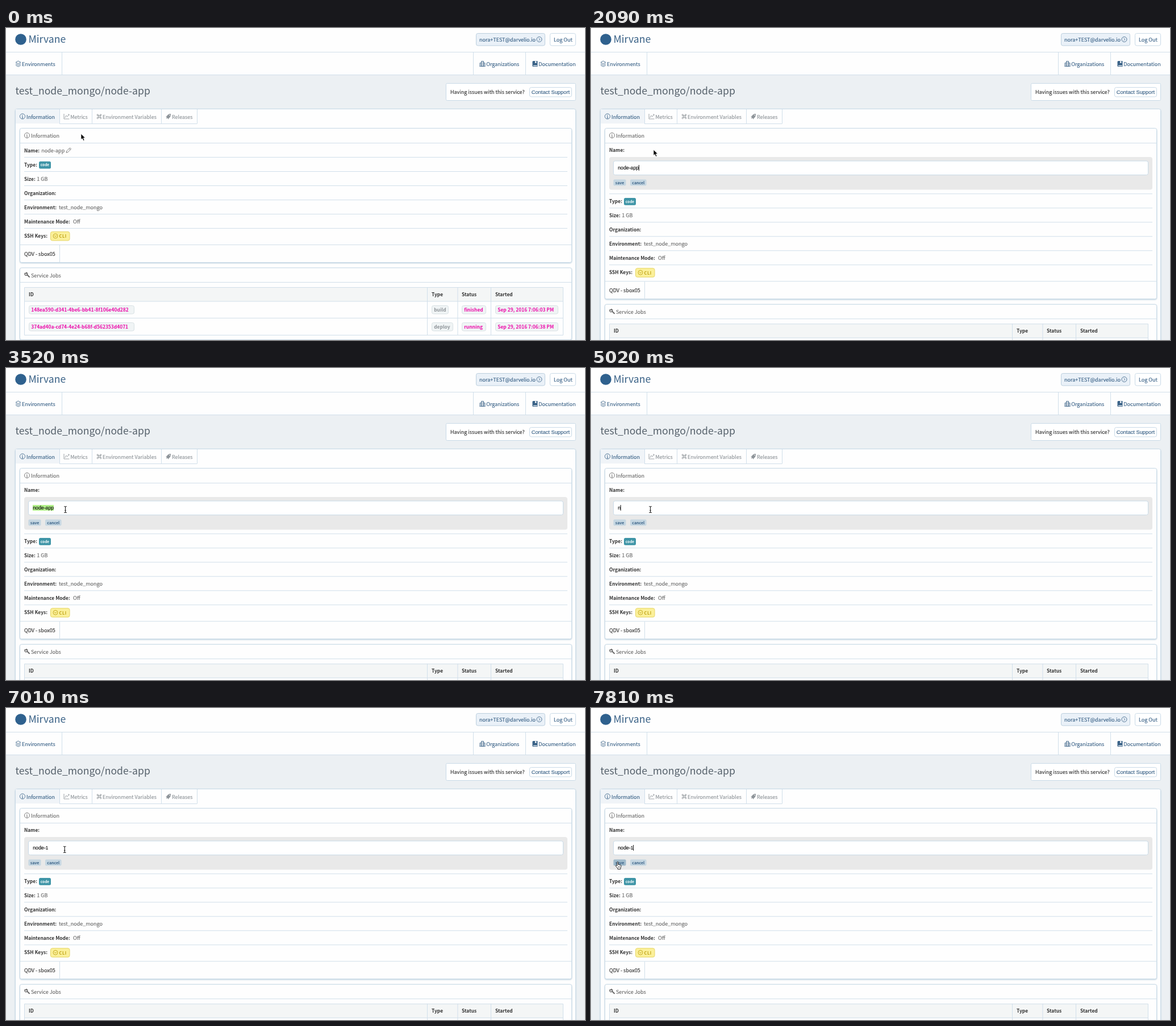
Animation of 1019x549 px, one loop 7990 ms. Source, as an HTML page:

```html
<!DOCTYPE html>
<html lang="en">
<head>
<meta charset="utf-8">
<title>Rename a service</title>
<style>
html, body { margin: 0; width: 100%; height: 100%; overflow: hidden; background: #ecf0f3; }
svg { display: block; width: 100%; height: 100%; }
text { font: 9px "Noto Sans CJK JP", "Noto Sans CJK SC", "Noto Sans CJK", "Noto Sans", sans-serif;
  fill: currentColor; stroke: currentColor; stroke-width: .15px; white-space: pre; }
.big { font-size: 17.6px; stroke-width: 0; }
.b { font-weight: 700; font-size: 8.43px; stroke-width: 0; }
.ui { font-family: "Liberation Sans", Arial, sans-serif; font-size: 9.34px; }
.field { font-size: 8.75px; }
.tiny { font-size: 7px; }
.dark { color: #333; } .grey { color: #6a6a6a; } .mute { color: #8e9499; }
.blue { color: #3a6287; } .pink { color: #ec0ca9; }
.box { fill: #fff; stroke: #c9dae7; }
.card { fill: #fefefe; stroke: #c9dae7; filter: drop-shadow(0 1px 1px #b9cedd); }
.line { fill: none; stroke: #d1dfea; }
.pill { fill: #f0f4f5; stroke: #d9e2e5; }
.icon { fill: none; stroke: currentColor; stroke-width: .85; stroke-linejoin: round; }
.solid { fill: currentColor; stroke: none; }
</style>
</head>
<body>
<svg viewBox="0 0 1019 549">
  <defs>
    <g id="info" class="icon"><circle r="4.6"/><path d="M0-.8V2.8M-1 2.8H1M-1-.8H0M0-2.8V-1.8"/></g>
  </defs>

  <rect width="1019" height="42" fill="#fefefe"/>
  <rect y="42" width="1019" height="40" fill="#fefefe"/>
  <path class="line" d="M0 42.5H1019M0 82.5H1019M98.5 43V82M822.5 43V82M914.5 43V82"/>

  <circle cx="26" cy="20" r="9.8" fill="#2f618e"/>
  <text class="big blue" x="39.5" y="26">Mirvane</text>
  <rect x="827.5" y="9.5" width="121" height="21.5" rx="3" fill="#eaf1f8" stroke="#bccfde"/>
  <text class="blue" x="833" y="23.5">nora+TEST@darvelio.io</text>
  <g class="icon blue"><circle cx="938.5" cy="20" r="4.5"/><path d="M937.5 17.8L939.8 20L937.5 22.2"/></g>
  <rect class="box" x="957.5" y="9.5" width="45" height="21.5" rx="3"/>
  <text class="blue" x="964" y="23.5">Log Out</text>

  <g class="blue">
    <path class="icon" d="M17 60.5L21.5 58L26 60.5L21.5 63ZM17 63L21.5 65.5L26 63M17 65.5L21.5 68L26 65.5"/>
    <text x="28" y="66.5">Environments</text>
    <path class="icon" d="M836.5 67.5V58.500H840.500V67.500M834 67.500V61.500H836.500M840.500 61.500H843V67.500M833.500 67.500H843.500"/>
    <path class="icon" stroke-dasharray="1 1" d="M837.800 60V67M839.300 60V67M835.200 63V67M841.800 63V67"/>
    <text x="845.3" y="66.5">Organizations</text>
    <path class="solid" fill-rule="evenodd" d="M928 58H935.500V68H928Q926.500 68 926.500 66.500V59.500Q926.500 58 928 58ZM928 65.800V67H934.700V65.800ZM931 58.500V62L932.200 61L933.500 62V58.500Z"/>
    <text x="937.3" y="66.5">Documentation</text>
  </g>

  <text class="big" color="#56616b" x="16.5" y="117">test_node_mongo/node-app</text>
  <rect class="box" x="774.5" y="97.5" width="228" height="30" rx="2"/>
  <text class="dark" x="782" y="116">Having issues with this service?</text>
  <rect class="box" x="921.5" y="104.5" width="74" height="16.5" rx="3"/>
  <text class="ui blue" x="924.7" y="116">Contact Support</text>

  <rect class="card" x="16.5" y="142.5" width="986" height="430" rx="3"/>
  <path fill="#f0f4f8" d="M17 143H94V168H17Z"/>
  <path class="line" d="M94.5 143V168M151.5 143V168M273.5 143V168M336.5 143V168M94 168.5H336.5"/>
  <use href="#info" x="29" y="155.5" class="blue"/>
  <text class="blue" x="36" y="159.5">Information</text>
  <g class="mute">
    <path class="icon" d="M102 151V160H111.5M103.500 158L106 154L108 156L111 152M109.300 152H111V153.700"/>
    <text x="113.3" y="159.5">Metrics</text>
    <g class="icon">
      <path d="M162.500 153V158.500M165.500 153V158.500M161.300 154.200H166.700M161.300 157.200H166.700"/>
      <circle cx="161.300" cy="153" r="1.200"/><circle cx="166.700" cy="153" r="1.200"/>
      <circle cx="161.300" cy="158.500" r="1.200"/><circle cx="166.700" cy="158.500" r="1.200"/>
    </g>
    <text x="170" y="159.5">Environment Variables</text>
    <path class="solid" fill-rule="evenodd" d="M290 151C286 151 284.500 153 283 155L281 156L283 156.800L282 159.500L285 158.500L285.500 161L287 158.500C289 157 290.200 155 290 151ZM288 152.500A.8.8 0 1 1 287.900 152.500Z"/>
    <text x="292" y="159.5">Releases</text>
  </g>

  <rect id="infoCard" class="card" x="24.5" y="176.5" width="971" rx="3"/>
  <path class="line" d="M25 202.5H995"/>
  <use href="#info" x="37" y="189" class="grey"/>
  <text class="grey" x="44" y="193">Information</text>
  <text id="nameLabel" class="b dark" x="32" y="219">Name:</text>

  <g id="nameView" class="grey">
    <text x="62.3" y="219">node-app</text>
    <path class="icon" d="M106 219.3L106.8 216.5L112.5 210.8L114.6 212.9L108.9 218.5ZM111 212.3L113.1 214.4"/>
  </g>

  <g id="editor">
    <rect x="32" y="227" width="956" height="57.5" rx="4" fill="#e9e9e9"/>
    <rect class="box" x="39.5" y="234" width="941" height="24.5" rx="3"/>
    <rect id="selection" x="47" y="241" width="37" height="10" fill="#b0ef89"/>
    <text id="field" class="ui field" color="#111" x="47.2" y="249.3"></text>
    <rect id="caret" y="241" width="1" height="10" fill="#111"/>
    <rect id="save" x="39.5" y="266.5" width="22" height="11" rx="2"/>
    <rect x="69" y="266.5" width="28.5" height="11" rx="2" fill="#c6d7e2"/>
    <text class="b tiny blue" x="42.7" y="274.5">save</text>
    <text class="b tiny blue" x="72.3" y="274.5">cancel</text>
  </g>

  <g id="lower">
    <path class="line" d="M32 227.5H988M32 252.5H988M32 277.5H988M32 302.5H988M32 327.5H988M32 352.5H988M25 381.5H995M94.5 382V412"/>
    <g class="dark">
      <text class="b" x="32" y="244">Type:</text>
      <text class="b" x="32" y="269">Size:</text>
      <text class="b" x="32" y="294">Organization:</text>
      <text class="b" x="32" y="319">Environment:</text>
      <text class="b" x="32" y="344">Maintenance Mode:</text>
      <text class="b" x="32" y="369">SSH Keys:</text>
    </g>
    <g class="grey">
      <text x="54.3" y="269">1 GB</text>
      <text x="93" y="319">test_node_mongo</text>
      <text x="118" y="344">Off</text>
    </g>
    <rect x="58" y="234.8" width="21" height="12.7" rx="2.5" fill="#3f95a7"/>
    <text class="b" style="font-size:6.5px" color="#fff" x="68.5" y="243.3" text-anchor="middle">code</text>
    <g color="#bd9f10">
      <rect x="78.5" y="358.5" width="33.5" height="15.5" rx="3" fill="#fbf09a" stroke="#e6d566"/>
      <g class="icon"><circle cx="87" cy="366" r="4"/><path d="M85 365L87 367.2L89 365"/></g>
      <text class="b" style="font-size:7.3px;letter-spacing:.6px" x="93.5" y="369.3">CLI</text>
    </g>
    <text class="dark" x="32" y="401">QDV - sbox05</text>

    <rect class="card" x="24.5" y="422" width="971" height="126.5" rx="3"/>
    <path class="line" d="M25 447.5H995"/>
    <g class="icon grey">
      <path stroke-width="1.4" d="M33.3 431.3A2.500 2.500 0 1 0 35.600 430.300L35.800 432.300Z"/>
      <path stroke-width="2" stroke-linecap="round" d="M37.300 434.300L41 438"/>
    </g>
    <text class="grey" x="44" y="439">Service Jobs</text>
    <rect x="32.5" y="456" width="948" height="25" fill="#f4f6f6"/>
    <path class="line" stroke="#d5dcdf" d="M32.5 456.5H980.5V540.5H32.5ZM32 481H981M32 510.5H981M741.5 456V541M795 456V541M853.5 456V541"/>
    <g class="dark">
      <text class="b" x="40" y="472">ID</text>
      <text class="b" x="749" y="472">Type</text>
      <text class="b" x="802" y="472">Status</text>
      <text class="b" x="861" y="472">Started</text>
    </g>
    <g id="jobs"></g>
  </g>

  <g id="arrow"><path d="M0 0V10L2.3 8L4.2 12L6 11.2L4.2 7.3H7.5Z" fill="#000" stroke="#fff" stroke-width=".7"/></g>
  <g id="ibeam"><path d="M-2.3-5.5Q0-5.5 0-4Q0-5.5 2.3-5.5M0-4.5V4.5M-2.3 5.5Q0 5.5 0 4Q0 5.5 2.3 5.5M-1.2 1.5H1.2" fill="none" stroke="#222" stroke-width="1.1"/></g>
  <g id="hand"><path d="M3 1C3-.3 5-.3 5 1V5L9 5.8Q10.3 6.2 10 8L9 11V13H4V11.5L.7 8C-.3 6.6 1.2 5.8 2 6.5L3 7.5Z" fill="#fff" stroke="#111" stroke-width=".9"/><path d="M5.4 8V10.5M7.2 8V10.5" stroke="#111" stroke-width=".7"/></g>
</svg>
<script>
const $ = id => document.getElementById(id);
const LOOP = 7990, EDIT_SHIFT = 64.3, LETTER = 4.87;

const pill = (x, y, width, label, tone) =>
  `<rect class="pill" x="${x}" y="${y}" width="${width}" height="14.5" rx="3"/>
   <text class="b ${tone}" x="${x + 3.7}" y="${y + 10.8}">${label}</text>`;
const job = (y, id, type, typeWidth, status, statusWidth, started) =>
  pill(40.5, y, 185, id, "pink") + pill(749.5, y, typeWidth, type, "mute") +
  pill(802.5, y, statusWidth, status, "pink") + pill(861.5, y, 110, started, "pink");
$("jobs").innerHTML =
  job(488.5, "148ea590-d341-4be6-bb41-8f106e40d282", "build", 29, "finished", 42, "Sep 29, 2016 7:06:03 PM") +
  job(518.5, "374ad40a-cd74-4e24-b68f-d562353d4071", "deploy", 37, "running", 42, "Sep 29, 2016 7:06:38 PM");

// Each step changes only the listed parts of the state.
const steps = [
  [0, { cursor: ["arrow", 132, 186.3], text: "node-app", caret: false }],
  [180, { cursor: ["arrow", 121.5, 203] }],
  [480, { cursor: ["arrow", 110, 214.3] }],
  [2090, { editing: true, caret: true }],
  [2390, { cursor: ["ibeam", 114.5, 249], caret: false }],
  [2630, { cursor: ["ibeam", 104.5, 249] }],
  [2930, { caret: true }],
  [3380, { caret: false }],
  [3520, { selected: true }],
  [5020, { selected: false, text: "n", caret: true }],
  [5320, { text: "no" }],
  [5490, { text: "node" }],
  [6090, { caret: false }],
  [6410, { text: "node-", caret: true }],
  [6560, { text: "node-1" }],
  [7010, { caret: false, cursor: ["ibeam", 103.2, 249] }],
  [7150, { cursor: ["ibeam", 60.5, 254] }],
  [7300, { cursor: ["arrow", 50.8, 264] }],
  [7450, { cursor: ["arrow", 44, 271] }],
  [7630, { hover: true, caret: true }],
  [7810, { cursor: ["hand", 43, 270.5] }],
];

const show = (id, on) => $(id).setAttribute("visibility", on ? "visible" : "hidden");

function draw(time) {
  const state = Object.assign({}, ...steps.filter(([at]) => at <= time).map(([, change]) => change));
  const { editing, text, cursor: [shape, x, y] } = state;
  const shift = editing ? EDIT_SHIFT : 0;

  show("nameView", !editing);
  show("editor", editing);
  show("selection", editing && state.selected);
  show("caret", editing && state.caret);
  $("lower").setAttribute("transform", `translate(0 ${shift})`);
  $("infoCard").setAttribute("height", 236 + shift);
  $("nameLabel").setAttribute("y", editing ? 218.3 : 219);

  $("field").textContent = text;
  const hyphen = text.includes("-") ? 1 : 0;
  $("caret").setAttribute("x", 47 + (text.length - hyphen) * LETTER + hyphen * 2.9 - .2);
  $("save").setAttribute("fill", state.hover ? "#9fbacb" : "#c6d7e2");

  for (const id of ["arrow", "ibeam", "hand"]) show(id, id === shape);
  $(shape).setAttribute("transform", `translate(${x} ${y})`);
}

const start = performance.now();
function tick() {
  draw((performance.now() - start) % LOOP);
  requestAnimationFrame(tick);
}
tick();
</script>
</body>
</html>
```
